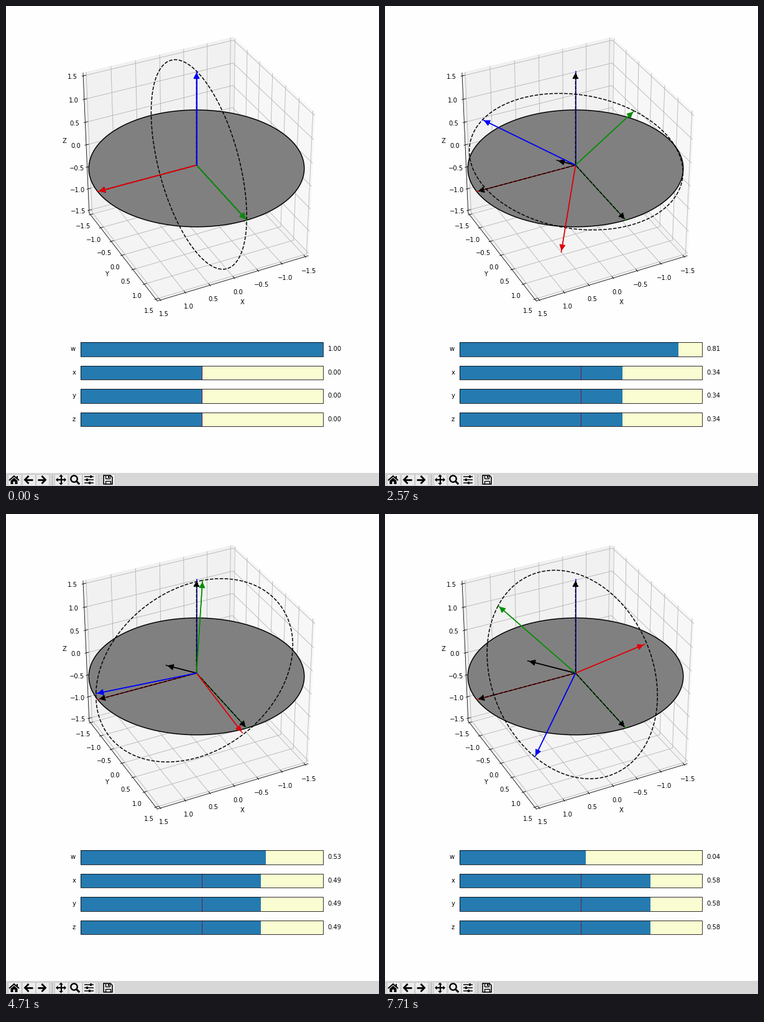
Animation of 600x771 px, one loop 8000 ms. Source, as a matplotlib script:

```python
import numpy as np
import matplotlib.pyplot as plt
from matplotlib.animation import FuncAnimation
from matplotlib.patches import Circle, FancyArrowPatch, Polygon, Rectangle

W, H = 600, 771
PX = 0.72                      # points per pixel at 100 dpi
LOOP, STEP = 8000, 40
BG = "#fefefe"
COLORS = [(0.88, 0, 0.03), (0.02, 0.56, 0.02), (0, 0, 0.97)]

# Camera
ELEV, AZIM = np.radians([32.75, 63.7])
SCALE, DIST = 86.5, 30.0
CX, CY = 306.5, 255.6
EDGE = 1.5625
RADIUS = 2.0
TICKS = np.arange(-3, 4) * 0.5

# Slider w over time, in units of 1/7 s; on HOLD units the pose stays
KEY_U = [6, 9, 12, 14, 16, 18, 24, 26, 29, 31, 33, 38, 40, 45, 49, 50, 52, 54]
KEY_W = [.99, .965, .90, .865, .83, .805, .76, .70, .625, .57, .53, .42, .40,
         .30, .19, .16, .08, .04]
HOLD = {7, 8, 15, 17, 19, 27, 30, 32, 34, 41, 51, 53, 55}

fig = plt.figure(figsize=(W / 100, H / 100), dpi=100, facecolor=BG)
ax = fig.add_axes([0, 0, 1, 1])
ax.set_xlim(0, W)
ax.set_ylim(H, 0)
ax.axis("off")
plt.rcParams["font.family"] = "DejaVu Sans"


def project(points):
    """Perspective view of 3D points, in pixels; returns x and y."""
    x, y, z = np.moveaxis(np.asarray(points, float), -1, 0)
    ground = np.cos(AZIM) * x + np.sin(AZIM) * y
    right = np.cos(AZIM) * y - np.sin(AZIM) * x
    up = np.cos(ELEV) * z - np.sin(ELEV) * ground
    depth = np.cos(ELEV) * ground + np.sin(ELEV) * z
    k = SCALE * DIST / (DIST - depth)
    return CX + k * right, CY - k * up


def line(x, y, color="black", width=1.5, **kw):
    return ax.plot(x, y, color=color, lw=width * PX, **kw)[0]


def line3d(points, color="black", width=1.5, **kw):
    return line(*project(points), color, width, **kw)


def text(x, y, s, **kw):
    return ax.text(x, y, s, fontsize=10 * PX, **kw)


def label(x, y, s):
    text(x, y + 3.65, s, ha="center", va="baseline")


def shape(points, face="black", edge="none", width=0.0, z=2):
    ax.add_patch(Polygon(points, fc=face, ec=edge, lw=width * PX, zorder=z))


def box(x0, y0, x1, y1, face="none", edge="none", width=0.0, z=2):
    patch = Rectangle((x0, y0), x1 - x0, y1 - y0, fc=face, ec=edge,
                      lw=width * PX, zorder=z)
    return ax.add_patch(patch)


def arrow(color, z, style="-"):
    patch = FancyArrowPatch((0, 0), (9, 9), arrowstyle="-|>", color=color,
                            mutation_scale=20 * PX, lw=1.5 * PX, ls=style,
                            shrinkA=2 * PX, shrinkB=2 * PX, zorder=z)
    return ax.add_patch(patch)


def point_to(shaft, head, tip):
    x, y = project([(0, 0, 0), tip])
    shaft.set_data(x, y)
    head.set_positions((x[0], y[0]), (x[1], y[1]))


def on_axes(i, a, j, b, k, c):
    p = np.zeros(3)
    p[[i, j, k]] = a, b, c
    return p


def draw_box():
    e = EDGE
    panes = [
        (0.95, [(-e, -e, -e), (-e, e, -e), (-e, e, e), (-e, -e, e)]),
        (0.90, [(-e, -e, -e), (e, -e, -e), (e, -e, e), (-e, -e, e)]),
        (0.925, [(-e, -e, -e), (e, -e, -e), (e, e, -e), (-e, e, -e)]),
    ]
    for g, corners in panes:
        tone = (g, g, g, 0.5)
        shape(np.column_stack(project(corners)), tone, tone, 1, z=0)

    # per axis: edge start, grid corner, grid end, tick direction, label shift
    specs = [
        (1, e, 2, -e, (-e, -e), (-e, e), 1, (5.7, 22.3)),
        (0, e, 2, -e, (-e, -e), (-e, e), 0, (-11.3, 18.6)),
        (0, e, 1, -e, (-e, -e), (-e, e), 0, (-17, 1.5)),
    ]
    for i, (j, b, k, c, mid, end, d, (dx, dy)) in enumerate(specs):
        line3d([on_axes(i, s * e, j, b, k, c) for s in (-1, 1)],
               width=0.8, zorder=1.2)
        for t in TICKS:
            start = on_axes(i, t, j, b, k, c)
            line3d([start, on_axes(i, t, j, mid[0], k, mid[1]),
                    on_axes(i, t, j, end[0], k, end[1])],
                   "#b0b0b0", 0.8, zorder=1)
            inner, outer = start.copy(), start.copy()
            inner[d] -= 0.05
            outer[d] += 0.025
            line3d([inner, outer], width=0.8, zorder=1.3)
            x, y = project(start)
            label(x + dx, y + dy, f"{t:.1f}".replace("-", "\u2212"))
    label(380, 475, "X")
    label(162, 430, "Y")
    label(93.5, 216, "Z")


def draw_toolbar():
    mid_y = 761
    box(0, 750, W, H, "#d7d7d7")
    for cx in (13, 36, 58, 88.5, 111, 133.5, 164):
        box(cx - 10.5, 752, cx + 10.5, 770, "#ececec", "#c4c4c4", 0.8)
    for x in (73.5, 149):
        line([x, x], [752, 770], "#b4b4b4", 1)

    def stroke(cx, pts, width):
        p = np.array(pts) + (cx, mid_y)
        line(p[:, 0], p[:, 1], width=width, zorder=4,
             solid_capstyle="butt", solid_joinstyle="miter")

    def fill(cx, pts):
        shape(np.array(pts) + (cx, mid_y), z=4)

    # home
    stroke(13, [(-8, 1), (0, -6), (8, 1)], 2)
    fill(13, [(4, -6), (6, -6), (6, -1), (4, -3)])
    fill(13, [(-5.5, 1.5), (0, -3.3), (5.5, 1.5), (5.5, 7), (1.5, 7),
              (1.5, 2.8), (-1.5, 2.8), (-1.5, 7), (-5.5, 7)])
    # back and forward
    for cx, s in ((36, 1), (58, -1)):
        stroke(cx, [(-5 * s, 0), (7 * s, 0)], 2.8)
        stroke(cx, [(0.5 * s, -6.2), (-5.5 * s, 0), (0.5 * s, 6.2)], 2.8)
    # move
    for dx, dy in ((1, 0), (-1, 0), (0, 1), (0, -1)):
        stroke(88.5, [(0, 0), (6 * dx, 6 * dy)], 2.2)
        fill(88.5, [(8.5 * dx, 8.5 * dy),
                    (5 * dx - 3.4 * dy, 5 * dy + 3.4 * dx),
                    (5 * dx + 3.4 * dy, 5 * dy - 3.4 * dx)])
    # zoom
    ax.add_patch(Circle((109.5, mid_y - 1.5), 5.2, fc="none", ec="black",
                        lw=2.4 * PX, zorder=4))
    stroke(111, [(2, 2), (7.2, 7.2)], 3)
    # settings
    for dy, knob in ((-5, 3), (0, -3.5), (5, 0.5)):
        stroke(133.5, [(-7.5, dy), (7.5, dy)], 1.5)
        stroke(133.5, [(knob - 1.5, dy), (knob + 1.5, dy)], 4)
    # save
    stroke(164, [(-7, -7), (4, -7), (7, -4), (7, 7), (-7, 7), (-7, -7.7)], 1.6)
    stroke(164, [(-4, -7), (-4, -2.5), (3, -2.5), (3, -7)], 1.4)
    fill(164, [(0, -6.5), (2.2, -6.5), (2.2, -3), (0, -3)])
    stroke(164, [(-4, 7), (-4, 1.5), (4, 1.5), (4, 7)], 1.4)


def draw_slider(name, row):
    top = 540 + 37.5 * row
    bottom = top + 22.5
    box(120, top, 510, bottom, "#fafcd2")
    bar = box(120, top, 315, bottom, "#257ab0", z=2.1)
    if row:
        line([315, 315], [top, bottom], "#6b1d4b", 1, zorder=2.2)
    box(120, top, 510, bottom, edge="black", width=0.8, z=2.3)
    y = top + 11.25
    text(112.2, y, name, ha="right", va="center")
    return bar, text(517.8, y, "", ha="left", va="center")


def rotation(w):
    """Turn about the (1, 1, 1) diagonal; returns matrix and rotation vector."""
    theta = 2 * np.arccos(w)
    n = np.ones(3) / np.sqrt(3)
    cross = np.array([[0, -1, 1], [1, 0, -1], [-1, 1, 0]]) / np.sqrt(3)
    c, s = np.cos(theta), np.sin(theta)
    return c * np.eye(3) + (1 - c) * np.outer(n, n) + s * cross, theta * n


draw_box()
draw_toolbar()
sliders = [draw_slider(name, row) for row, name in enumerate("wxyz")]

phi = np.linspace(0, 2 * np.pi, 181)
zero = 0 * phi
flat = RADIUS * np.column_stack([np.cos(phi), np.sin(phi), zero])
upright = RADIUS * np.column_stack([zero, np.cos(phi), np.sin(phi)])
shape(np.column_stack(project(flat)), "#808080", "black", 1.5, z=3)

for color, tip in zip(COLORS, RADIUS * np.eye(3)):
    point_to(line([], [], color, zorder=4), arrow("black", 4.1, "--"), tip)

ring = line([], [], ls="--", zorder=4.5)
frame_vecs = [(line([], [], c, zorder=5), arrow(c, 5.1)) for c in COLORS]
axis_vec = (line([], [], zorder=4.7), arrow("black", 4.8))


def w_at(unit):
    while unit in HOLD:
        unit -= 1
    return 1.0 if unit < KEY_U[0] else float(np.interp(unit, KEY_U, KEY_W))


def update(i):
    w = w_at(int((i * STEP + STEP - 1) * 7 / 1000))
    turn, spin = rotation(w)
    ring.set_data(*project(upright @ turn.T))
    for vec, tip in zip(frame_vecs, RADIUS * turn.T):
        point_to(*vec, tip)
    for part in axis_vec:
        part.set_visible(w < 1)
    if w < 1:
        point_to(*axis_vec, spin)
    side = np.sqrt((1 - w * w) / 3)
    for (bar, value), v in zip(sliders, (w, side, side, side)):
        bar.set_width(195 * (1 + v))
        value.set_text(f"{v:.2f}")
    return []


anim = FuncAnimation(fig, update, frames=LOOP // STEP, interval=STEP,
                     init_func=lambda: update(0), repeat=True,
                     repeat_delay=0, blit=False)
plt.show()
```
